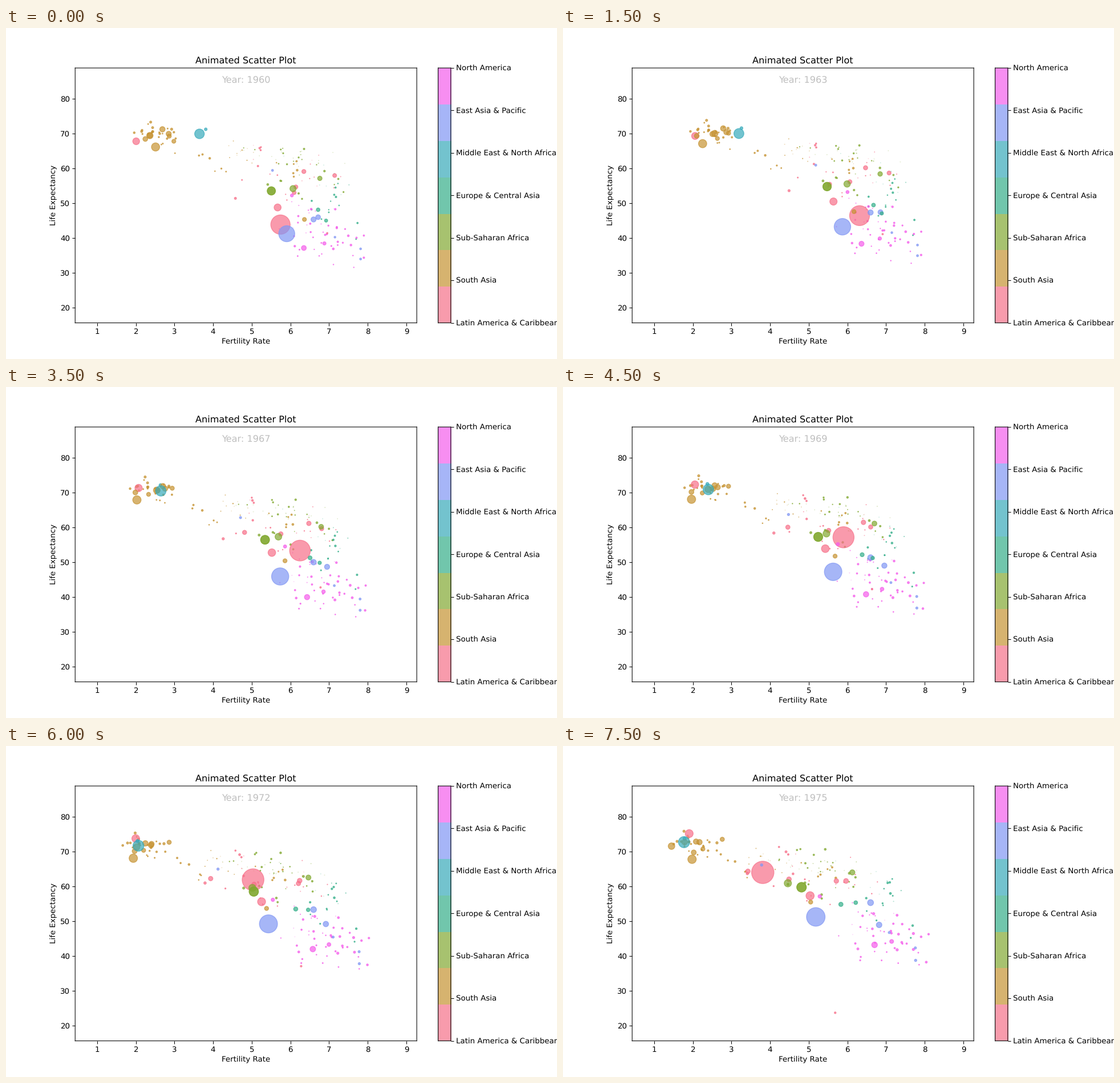
A matplotlib script for the animation above (8000 ms loop, 966 by 580 pixels).

```python
import matplotlib.pyplot as plt
import numpy as np
from matplotlib.animation import FuncAnimation

FRAMES, INTERVAL = 16, 500
DPI = 96
K = 96.6 / DPI
plt.rcParams.update({"font.family": "DejaVu Sans", "font.size": 10 * K,
                     "text.hinting": "none"})

REGIONS = ["Latin America & Caribbean", "South Asia", "Sub-Saharan Africa",
           "Europe & Central Asia", "Middle East & North Africa",
           "East Asia & Pacific", "North America"]
PALETTE = [(.968, .441, .536), (.776, .578, .195), (.511, .661, .193),
           (.204, .686, .541), (.217, .668, .732), (.505, .591, .958),
           (.959, .366, .923)]
PINK, GOLD, GREEN, TEAL, CYAN, BLUE, MAGENTA = PALETTE

T = np.linspace(0, 1, FRAMES)
# Fertility falls late, life expectancy rises steadily
EASE = np.array([T ** 1.9, T]).T
EDGE = 0.65
rng = np.random.default_rng(7)
paths, radii, colors = [], [], []


def bubble(color, r, *points):
    """Ease between two stage points, or curve through evenly timed ones."""
    p = np.array(points, float)
    if len(p) == 2:
        path = p[0] + (p[1] - p[0]) * EASE
    else:
        knots = np.linspace(0, 1, len(p))
        fit = np.polyfit(knots, p, len(p) - 1)
        path = np.array([np.polyval(c, T) for c in fit.T]).T
    growth = 0.03 if color == GOLD else 0.15
    paths.append(path)
    radii.append(r * (1 + growth * T))
    colors.append(color)


def cloud(color, n, center, spread, drift, sizes, slope=0):
    """Scatter n small dots around a centre, drifting much the same way."""
    for _ in range(n):
        dx, dy = np.clip(rng.normal(size=2), -1.7, 1.7) * spread
        start = np.array([center[0] + dx, center[1] + dy + slope * dx])
        end = start + np.array(drift) * rng.uniform(0.6, 1.3)
        r = sizes[0] + (sizes[1] - sizes[0]) * rng.random() ** 1.3
        bubble(color, r, start, end)


TINY, SMALL = (0.6, 1.2), (1.2, 2.4)
cloud(GREEN, 22, (510, 232), (55, 18), (-55, -14), TINY, 0.15)
cloud(PINK, 14, (510, 262), (45, 30), (-35, -22), TINY, 0.3)
cloud(GOLD, 12, (430, 224), (50, 10), (-65, -20), TINY, 0.3)
cloud(MAGENTA, 14, (530, 345), (30, 25), (6, -28), TINY)
cloud(TEAL, 7, (555, 275), (40, 30), (-10, -25), TINY)

cloud(GOLD, 22, (262, 184), (22, 11), (-32, -12), (1.4, 2.6), 0.1)
cloud(GOLD, 7, (350, 232), (32, 8), (-60, -28), SMALL, 0.3)
cloud(GOLD, 6, (500, 250), (20, 10), (-45, -25), SMALL)
cloud(GREEN, 16, (515, 262), (45, 32), (-65, -32), SMALL, 0.4)
cloud(PINK, 7, (490, 250), (45, 30), (-60, -28), SMALL)
cloud(TEAL, 13, (580, 315), (26, 32), (-5, -42), SMALL)
cloud(MAGENTA, 34, (566, 368), (36, 30), (12, -30), SMALL)
cloud(BLUE, 3, (545, 390), (45, 15), (-5, -42), (2.2, 2.5))

# Asia
bubble(BLUE, 4.8, (547, 331), (563, 314), (554, 313))
bubble(PINK, 17.6, (481, 344), (525, 309), (475, 252), (350, 221))
bubble(BLUE, 14.7, (492, 360), (443, 299))
bubble(PINK, 6.8, (476, 314), (433, 262))
bubble(PINK, 6.6, (228, 198), (232, 175), (221, 153))
bubble(PINK, 4, (505, 288), (412, 252), (324, 219))
bubble(PINK, 2.5, (402, 298), (378, 263), (323, 223))
bubble(BLUE, 5.1, (539, 335), (539, 274))
bubble(PINK, 4, (576, 258), (479, 236))
bubble(PINK, 4.1, (508, 278), (396, 233))
bubble(PINK, 4.2, (522, 251), (530, 238), (496, 236))
bubble(BLUE, 2.4, (467, 249), (407, 227), (348, 208))
bubble(PINK, 1.9, (563, 359), (557, 355), (535, 360), (477, 467))

# Africa and the Middle East
bubble(TEAL, 3.8, (547, 318), (487, 277))
bubble(TEAL, 3.4, (561, 337), (513, 274))
bubble(MAGENTA, 3.5, (558, 377), (557, 357), (576, 342))
bubble(MAGENTA, 4.9, (522, 385), (546, 348))
bubble(MAGENTA, 3.2, (501, 293), (450, 263))

# The Americas
bubble(GREEN, 6.1, (503, 281), (394, 240))
for _ in range(2):
    bubble(GREEN, 7.8, (465, 285), (418, 247))
bubble(GREEN, 4.5, (550, 263), (551, 243), (507, 221))
bubble(CYAN, 3, (350, 177), (266, 171), (213, 162))

# Europe
bubble(GOLD, 5.1, (285, 185), (277, 177), (233, 167))
bubble(GOLD, 6.2, (252, 188), (262, 180), (190, 175))
bubble(GOLD, 5.2, (252, 188), (265, 180), (239, 168))
bubble(GOLD, 4.1, (294, 198), (248, 187), (245, 180))
bubble(GOLD, 4.2, (286, 189), (291, 176), (279, 163))
bubble(GOLD, 4.8, (244, 194), (226, 184), (229, 186))
bubble(GOLD, 4.1, (523, 335), (486, 302), (434, 273))
bubble(GOLD, 7.8, (262, 208), (228, 197), (226, 198))
bubble(GOLD, 5.3, (274, 177), (273, 173), (213, 168))
bubble(CYAN, 9.1, (339, 185), (267, 181), (212, 168))

# Stage pixels to data units, and pixel radii to marker areas
paths = np.array(paths)
offsets = np.stack([1 + (paths[..., 0] - 159.5) / 67.79,
                    80 - (paths[..., 1] - 123.5) / 6.1], axis=-1)
areas = (1.5 * np.maximum(np.array(radii) - EDGE, 0.1)) ** 2

fig = plt.figure(figsize=(966 / DPI, 580 / DPI), dpi=DPI)
ax = fig.add_axes([0.1255, 0.1092, 0.62, 0.77])
ax.set(xlim=(0.432, 9.268), ylim=(15.62, 88.84),
       xticks=range(1, 10), yticks=range(20, 81, 10),
       title="Animated Scatter Plot",
       xlabel="Fertility Rate", ylabel="Life Expectancy")
dots = ax.scatter(offsets[:, 0, 0], offsets[:, 0, 1], s=areas[:, 0],
                  c=colors, alpha=0.7, linewidths=1)
year = ax.text(0.5, 0.95, "", transform=ax.transAxes, ha="center",
               va="center", color="gray", alpha=0.5, fontsize=12 * K)

bar = fig.add_axes([0.7842, 0.1092, 0.0231, 0.77])
bar.imshow(np.array(PALETTE)[:, None], extent=(0, 1, 0, 6), origin="lower",
           aspect="auto", interpolation="nearest", alpha=0.7)
bar.set_xticks([])
bar.yaxis.tick_right()
bar.set_yticks(range(7), REGIONS)

for spine in (*ax.spines.values(), *bar.spines.values()):
    spine.set_snap(False)


def update(i):
    dots.set_offsets(offsets[:, i])
    dots.set_sizes(areas[:, i])
    year.set_text(f"Year: {1960 + i}")
    return dots, year


anim = FuncAnimation(fig, update, frames=FRAMES, interval=INTERVAL,
                     repeat=True, repeat_delay=0)
plt.show()
```
